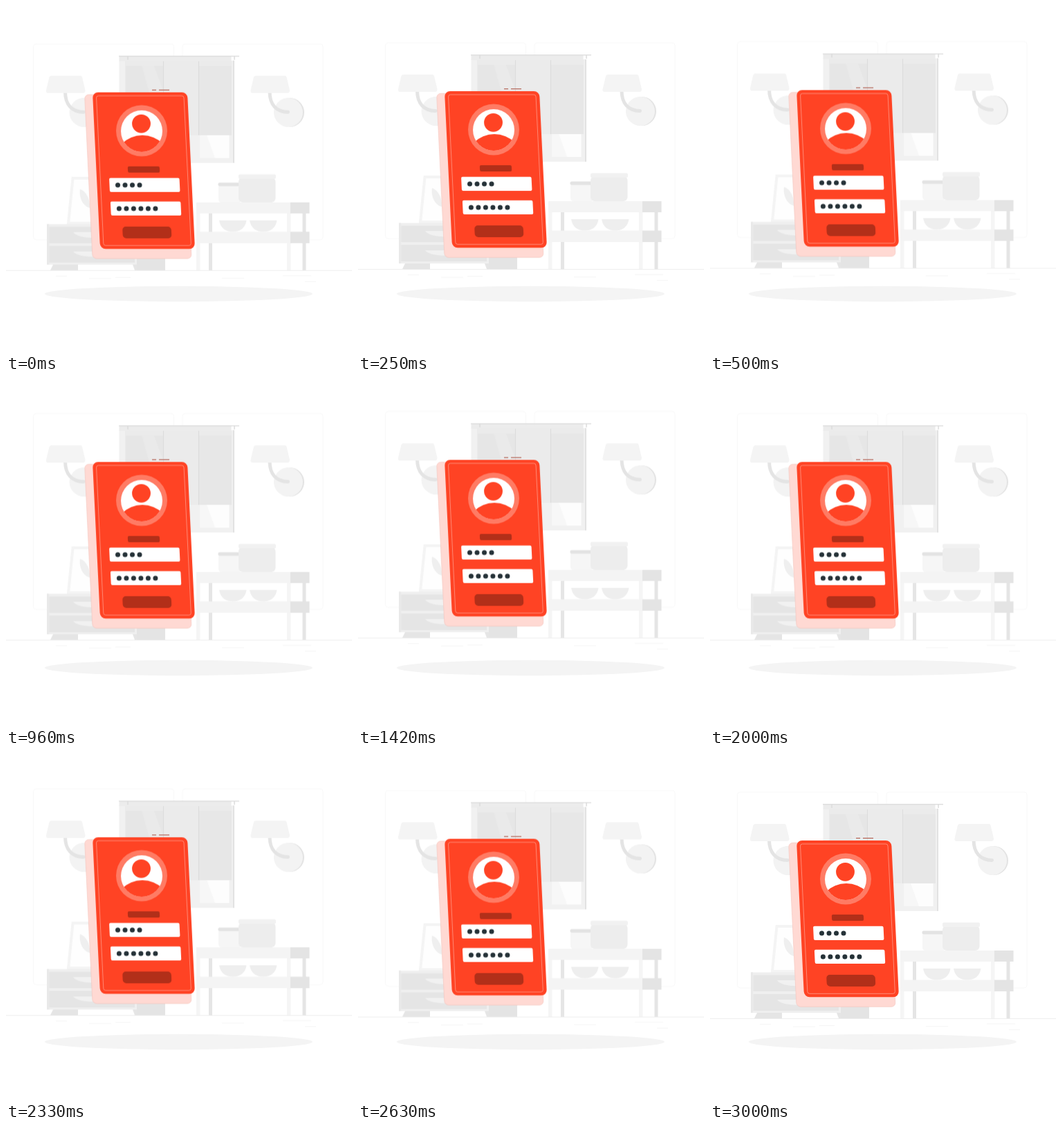
Write an HTML page that moves like this. It is 500x500 px and loops after 3040 ms.

```html
<!DOCTYPE html>
<html lang="en">
<head>
<meta charset="utf-8">
<title>Login card</title>
<style>
  html, body { margin: 0; width: 100%; height: 100%; overflow: hidden; background: #fff; }
  svg { display: block; width: 100vw; height: 100vh; }
  #scene { will-change: transform; }
</style>
</head>
<body>
<svg viewBox="0 0 500 500">
  <defs>
    <clipPath id="face"><circle cx="196" cy="181" r="30"/></clipPath>
    <g id="lamp">
      <circle cx="410" cy="154" r="21" fill="#e3e3e3"/>
      <circle cx="408" cy="154" r="21" fill="#f3f3f3"/>
      <path d="M381 124C381 143 391 153 407.500 153.500" fill="none" stroke="#e4e4e4" stroke-width="5" stroke-linecap="round"/>
      <path d="M361 101H403Q405 101 405.500 103L410 122Q410 126 407 126H356Q353 126 353.500 122L358 103Q359 101 361 101Z" fill="#f4f4f4"/>
    </g>
    <path id="bowl" d="M0 0H39.500C38 11 30 16.500 19.750 16.500S1.500 11 0 0Z" fill="#eee"/>
  </defs>

  <ellipse cx="249.500" cy="416" rx="193.500" ry="11.200" fill="#f4f4f4"/>

  <g id="scene">
    <!-- walls and floor -->
    <g fill="none" stroke="#f8f8f8">
      <rect x="39.500" y="55" width="203" height="283" rx="4"/>
      <rect x="255" y="55" width="203" height="283" rx="4"/>
    </g>
    <path d="M0 382.500H500" stroke="#eee"/>
    <path d="M72 390.500H88M120 394H152M158 392.500H180M312 393.500H344M400 390H441M432 398.500H448" stroke="#f5f5f5"/>

    <!-- window -->
    <rect x="163.500" y="79" width="166.500" height="148" fill="#f1f1f1"/>
    <rect x="328" y="79" width="2" height="148" fill="#e2e2e2"/>
    <rect x="280" y="187" width="42.500" height="33" fill="#fdfdfd"/>
    <path d="M280 187H290L302 220H280Z" fill="#f7f7f7"/>
    <rect x="172" y="80" width="154" height="107" fill="#ebebeb"/>
    <rect x="173" y="87" width="54" height="100" fill="#e6e6e6"/>
    <rect x="279" y="87" width="47" height="100" fill="#e7e7e7"/>
    <path d="M196 87H214L227 122V187H224Z" fill="#eaeaea"/>
    <path d="M227.500 80V187M278.500 80V187" stroke="#dcdcdc"/>
    <rect x="163.500" y="73" width="162" height="7" fill="#ececec"/>
    <path d="M163 72.700H337" stroke="#dfdfdf" stroke-width="1.500"/>
    <path d="M176 73V78M330 73V78" stroke="#dcdcdc" stroke-width="1.500"/>

    <use href="#lamp" x="-295.500"/>
    <use href="#lamp"/>

    <!-- picture and cabinet -->
    <path d="M96.500 249H150V314H90Z" fill="#fefefe" stroke="#f4f4f4" stroke-width="4"/>
    <path d="M107 265C116 268 122 280 121 292C112 290 105 278 107 265Z" fill="#efefef"/>
    <rect x="59" y="315.500" width="130" height="58.500" fill="#efefef"/>
    <rect x="189" y="315.500" width="41" height="66.500" fill="#e4e4e4"/>
    <path d="M59 315.500H62V374H59Z" fill="#e9e9e9"/>
    <path d="M62.500 319.500H186V343H62.500ZM62.500 347H186V371H62.500Z" fill="#e5e5e5"/>
    <path d="M97 327H152C148 338 103 338 97 327ZM97 355H152C148 365 103 365 97 355Z" fill="#f1f1f1"/>
    <path d="M68 374H104V382H64ZM183 374H190V382H186Z" fill="#e5e5e5"/>

    <!-- shelf and pots -->
    <path d="M293 300H298V382H293ZM428.500 300H433.500V382H428.500Z" fill="#e5e5e5"/>
    <path d="M275 300H280.500V382H275ZM406 300H411.500V382H406Z" fill="#f5f5f5"/>
    <use href="#bowl" x="308" y="310"/>
    <use href="#bowl" x="352" y="310"/>
    <path d="M275 284H411V300H275ZM275 326.500H411V343H275Z" fill="#f4f4f4"/>
    <path d="M411 284H438.500V300H411ZM411 326.500H438.500V343H411Z" fill="#e4e4e4"/>
    <path d="M307 256H338V284H311Q307 284 307 279Z" fill="#f6f6f6"/>
    <rect x="306.500" y="255.500" width="32" height="5" rx="2" fill="#e3e3e3"/>
    <rect x="336" y="248" width="53.500" height="36" rx="6" fill="#ededed"/>
    <rect x="336" y="243.500" width="54" height="6.500" rx="2" fill="#f1f1f1"/>

    <!-- card -->
    <path d="M211 121.700H217M221 121.700H236" stroke="#b5695c" stroke-width="1.200"/>
    <g id="card"></g>
    <circle cx="196" cy="180.500" r="37" fill="#ff7b64"/>
    <circle cx="196" cy="181" r="30" fill="#fff"/>
    <g fill="#ff4324">
      <circle cx="195.500" cy="170.300" r="13.400"/>
      <circle cx="197" cy="229" r="42" clip-path="url(#face)"/>
    </g>
    <g id="dots" fill="#263238"></g>
  </g>
</svg>
<script>
  const NS = 'http://www.w3.org/2000/svg';
  const add = (parent, tag, attrs) => {
    const el = document.createElementNS(NS, tag);
    for (const key in attrs) el.setAttribute(key, attrs[key]);
    document.getElementById(parent).append(el);
  };

  // Card parts lean to the right; x is the left edge at mid height.
  const LEAN = 11 / 226;
  const slab = (x, y, width, height, rx, fill, more) => add('card', 'rect', {
    x, y, width, height, rx, fill,
    transform: `matrix(1 0 ${LEAN} 1 ${-LEAN * (y + height / 2)} 0)`, ...more
  });
  slab(119.3, 128.3, 143, 237, 6, '#ffd9d3', { stroke: '#f3c3bb', 'stroke-width': .6 });
  slab(130.5, 125, 137, 226.3, 8, '#ff4324');
  slab(135.7, 130, 126.5, 216.3, 3, 'none', { stroke: '#ffa798', 'stroke-width': .7 });
  slab(176, 232, 46, 9, 2, '#b22f19');
  slab(149.5, 248.8, 101.5, 20.2, 2, '#fff');
  slab(151.3, 282.7, 101.5, 20.2, 2, '#fff');
  slab(168.5, 319, 70.5, 17, 5, '#b22f19');

  const dots = (x, cy, count) => {
    for (let i = 0; i < count; i++) add('dots', 'circle', { cx: x + i * 10.5, cy, r: 3.5 });
  };
  dots(161.5, 259, 4);
  dots(163.4, 293, 6);

  // Even rise and fall by 10 units, shown at 24 pictures a second.
  const LOOP = 3040, STEPS = 73, RISE = 10, TICK = 1000 / 24;
  const lift = i => {
    const p = (i + 1) / STEPS % 1;
    return -RISE * (1 - Math.abs(1 - 2 * p));
  };
  const frames = Array.from({ length: STEPS }, (_, i) => ({
    offset: i * TICK / LOOP,
    transform: `translateY(${lift(i).toFixed(3)}px)`,
    easing: 'step-end'
  }));
  frames.push({ offset: 1, transform: frames[STEPS - 1].transform });
  document.getElementById('scene').animate(frames, { duration: LOOP, iterations: Infinity });
</script>
</body>
</html>
```
